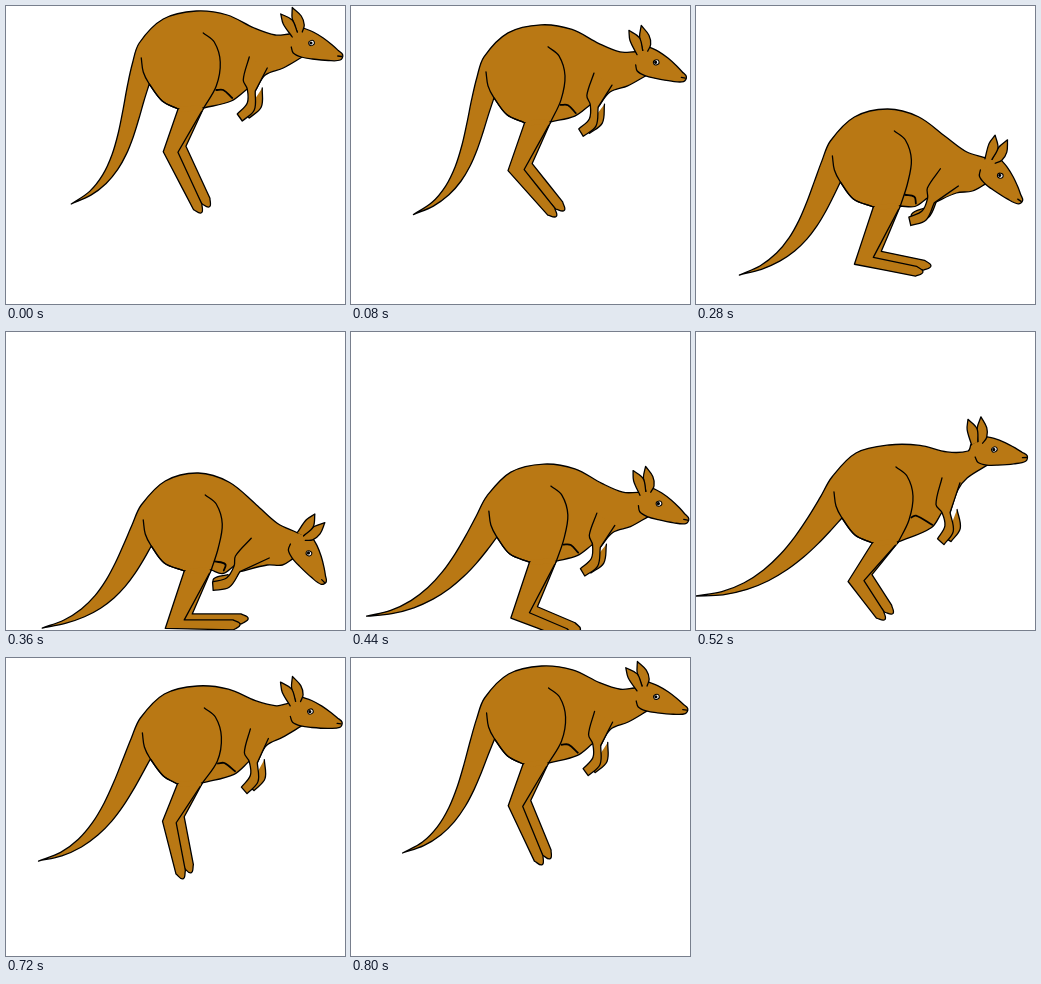
An HTML page that plays this animation: 339 by 298 pixels, repeating every 840 ms.

```html
<!DOCTYPE html>
<html lang="en">
<head>
<meta charset="utf-8">
<title>Hopping kangaroo</title>
<style>
html, body { margin: 0; width: 100%; height: 100%; overflow: hidden; background: #fff; }
svg { display: block; width: 100%; height: 100%; }
path { stroke: #000; stroke-width: 1.3; stroke-linejoin: round; stroke-linecap: round; fill: none; }
.skin { fill: #b97814; }
#seam { stroke: #b97814; stroke-width: 5; stroke-linecap: butt; }
#pouch { stroke-width: 1.8; }
</style>
</head>
<body>
<svg viewBox="0 0 339 298">
  <g id="roo">
    <path id="farLeg" class="skin"/>
    <path id="farArm" class="skin"/>
    <path id="body" class="skin"/>
    <path id="leg" class="skin"/>
    <path id="seam"/>
    <path id="thigh"/>
    <path id="rump"/>
    <path id="pouch"/>
    <path id="arm" class="skin"/>
    <g id="head">
      <path id="face" class="skin"/>
      <path d="M331.5 50L335.5 50.5"/>
      <ellipse cx="305.3" cy="37" rx="2.9" ry="2.5" fill="#fff" stroke="#000" transform="rotate(-20 305.3 37)"/>
      <circle cx="304.7" cy="37" r="1.6"/>
    </g>
    <g id="ears">
      <path id="earFar" class="skin"/>
      <path id="earNear" class="skin"/>
    </g>
  </g>
</svg>
<script>
const LOOP = 840, STEP = 40;

// One hop: time, drop of the body, drop of the neck, tail tip x and y, foot angle, foot length.
const HOP = [
  [0, 0, 0, 65, 198, 58, 65],
  [160, 41, 10, 57, 188, 25, 54],
  [280, 98, 25, 42, 171, 6.5, 62],
  [360, 136, 35, 34, 160, -3, 68],
  [520, 108, -24, -3, 156, 46, 46],
  [640, 53, -12, 15, 169, 78, 49],
  [800, 3, -1, 51, 192, 60, 61]
];
const CHEEK = [285, 41], EARS = [290, 25];

const $ = id => document.getElementById(id);
const draw = (id, d) => $(id).setAttribute('d', d);
const move = (id, x, y, deg = 0) => $(id).setAttribute('transform', `translate(${x} ${y}) rotate(${deg})`);
const add = (p, q) => [p[0] + q[0], p[1] + q[1]];
const rad = deg => deg * Math.PI / 180;
const turnBy = ([x, y], deg) => {
  const c = Math.cos(rad(deg)), s = Math.sin(rad(deg));
  return [x * c - y * s, x * s + y * c];
};

// Smooth curve inside each run, corner between runs.
function trace(...runs) {
  const xy = p => p.map(v => v.toFixed(2)).join(' ');
  let d = 'M' + xy(runs[0][0]);
  for (const p of runs) {
    for (let i = 0; i < p.length - 1; i++) {
      const a = p[i - 1] || p[i], b = p[i], c = p[i + 1], e = p[i + 2] || c;
      const len = Math.hypot(c[0] - b[0], c[1] - b[1]);
      const ctl = (u, v, q, side) => {
        const m = side * len / 3 / (Math.hypot(v[0] - u[0], v[1] - u[1]) || 1);
        return xy([q[0] + (v[0] - u[0]) * m, q[1] + (v[1] - u[1]) * m]);
      };
      d += `C${ctl(a, c, b, 1)} ${ctl(b, e, c, -1)} ${xy(c)}`;
    }
  }
  return d;
}

function bezier(p0, p1, p2, p3, n = 8) {
  return Array.from({ length: n + 1 }, (_, i) => {
    const u = i / n, w = 1 - u;
    return [0, 1].map(k => w * w * w * p0[k] + 3 * w * w * u * p1[k] + 3 * w * u * u * p2[k] + u * u * u * p3[k]);
  });
}

const keyAt = i => {
  const n = HOP.length, lap = Math.floor(i / n);
  const [t, ...rest] = HOP[i - lap * n];
  return [t + lap * LOOP, ...rest];
};

// Monotone cubic through the keys, so turning points do not overshoot.
function hopAt(t) {
  let i = HOP.length - 1;
  while (HOP[i][0] > t) i--;
  const k = [-1, 0, 1, 2].map(j => keyAt(i + j));
  const h = k[2][0] - k[1][0], u = (t - k[1][0]) / h, w = 1 - u;
  const slope = (a, b) => (a * b <= 0 ? 0 : 2 * a * b / (a + b) * h);
  return k[1].slice(1).map((v, n) => {
    const s = [0, 1, 2].map(j => (k[j + 1][n + 1] - k[j][n + 1]) / (k[j + 1][0] - k[j][0]));
    return v * w * w * (1 + 2 * u) + slope(s[0], s[1]) * u * w * w
      + k[2][n + 1] * u * u * (3 - 2 * u) - slope(s[1], s[2]) * u * u * w;
  });
}

function legPath(top, hock, crotch, angle, len) {
  const c = Math.cos(rad(angle)), s = Math.sin(rad(angle));
  const along = (d, side) => add(hock, [c * d + s * side, s * d - c * side]);
  const toe = add(hock, [c * len, s * len]);
  const ankle = add(hock, [13 + 6 * c * c, 10 * s - 8]);
  const sole = add(toe, [-5 * s, 5 * c]), front = add(toe, [5 * s, -5 * c]);
  return trace([top, hock], [hock, sole], [sole, along(len + 7, 0), front], [front, ankle], [ankle, crotch]);
}

function render(t) {
  const [drop, neck, tipX, tipY, angle, len] = hopAt(t);
  const up = Math.min(neck, 0), down = Math.max(neck, 0);
  const sway = 1.5 - 1.5 * Math.cos(2 * Math.PI * (t - 80) / LOOP);
  move('roo', sway, drop);

  // Head and ears
  const turn = 0.42 * up + 1.08 * down;
  const cheek = add(CHEEK, [0.37 * up - 0.08 * down, neck]);
  const onHead = (x, y) => add(cheek, turnBy([x - CHEEK[0], y - CHEEK[1]], turn));
  move('head', ...onHead(0, 0), turn);
  move('ears', ...onHead(...EARS), 1.85 * Math.abs(turn));

  // Tail: both edges leave the rump and sweep into the tip
  const tip = [tipX, tipY], rump = [133, 37], root = [143, 78];
  const reach = tipX - rump[0];
  const sweep = add(tip, [40 - 0.25 * reach, -50 - reach / 3]);
  const upper = bezier(tip, sweep, add(rump, [0.12 * reach - 14, 52]), rump);
  const lower = bezier(root, add(root, [0.17 * reach - 4, 60 + 0.22 * reach]), add(sweep, [2, 8]), tip);

  // Legs
  const flat = Math.cos(rad(angle));
  const top = [167 + 9 * flat, 103], crotch = [191 + 12 * flat, 102];
  const hock = [157 + 0.33 * up, 140 + 20.5 * flat * flat + 0.35 * up];
  draw('leg', legPath(top, hock, crotch, angle, len));
  draw('farLeg', legPath(add(top, [8, -6]), add(hock, [8, -6]), crotch, angle, len));
  draw('seam', trace([add(top, [1.5, 0]), add(crotch, [-1.5, 0])]));

  // Arm: the forearm swings back as the neck goes down
  const elbow = [237 - 0.28 * down, 74 + 0.4 * neck], swing = 0.9 * Math.max(neck, -14);
  const fore = (x, y) => add(elbow, turnBy([x, y], swing));
  const inner = fore(4, 9), wrist = fore(4, 23), knuckle = fore(-6, 34), paw = fore(-1, 41);
  const front = fore(11, 30), bend = fore(12, 11);
  draw('arm', trace([[243, 51 + 0.55 * neck], elbow, inner, wrist, knuckle], [knuckle, paw],
    [paw, front, bend], [bend, [261, 62 + 0.8 * neck]]));
  const gap = [Math.min(7, 7 - neck / 6), -3];
  draw('farArm', trace([wrist, knuckle, paw].map(p => add(p, gap)), [paw, front, bend].map(p => add(p, gap))));

  // Torso
  const seat = [156, 95], belly = [225 - 0.3 * neck, 95 + 0.3 * neck];
  const back = [[157, 13], [190, 5], [221, 9 + 0.15 * neck], [248, 22 + 0.42 * neck], [269, 29 + 0.75 * neck]];
  const nape = onHead(283, 28), crown = onHead(297, 23), throat = onHead(296, 51);
  const chest = [add(cheek, [-8, 21]), [259, 69 + 0.8 * neck]];
  draw('body', trace([...upper, ...back, nape], [nape, crown], [crown, throat], [throat, ...chest, bend],
    [bend, inner], [inner, belly, crotch], [crotch, top], [top, seat, root], lower) + 'Z');
  draw('thigh', trace([[197, 27], [208, 36], [214, 56], [210, 80], crotch]));
  draw('rump', trace([[135, 52], [137, 66], root, seat, top]));
  draw('pouch', trace([[210 - 0.1 * neck, 84 + 0.27 * neck], [217, 84 + 0.35 * neck], add(belly, [1, -3])]));
}

draw('face', trace([[297, 22], [307, 26], [317, 32], [326, 39], [332, 44.5], [336.5, 49], [334, 54],
  [322, 54.5], [306, 53], [295, 51], [287, 47], CHEEK]));
draw('earFar', trace([[1, 1], [-4, -12], [-4, -23.5]], [[-4, -23.5], [5, -15], [8, -6], [6, 1]]));
draw('earNear', trace([[-4, 6], [-13, -7], [-15.5, -17]], [[-15.5, -17], [-4, -11], [1, 1]]));

const start = performance.now();
function tick() {
  const t = (performance.now() - start) % LOOP;
  render(Math.floor(t / STEP) * STEP);
  requestAnimationFrame(tick);
}
tick();
</script>
</body>
</html>
```
